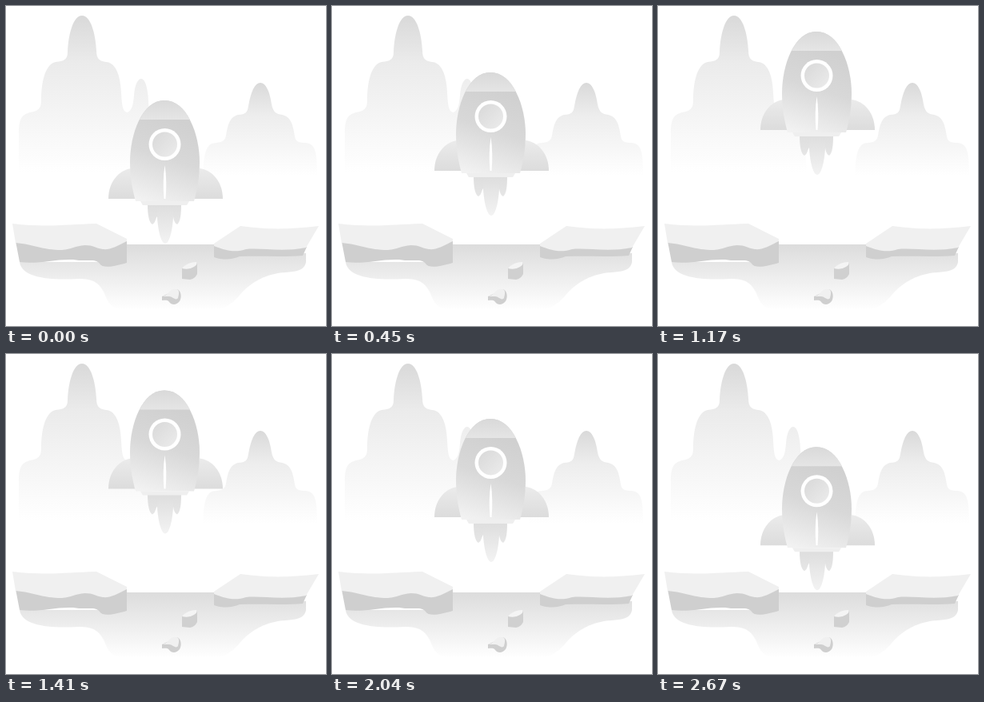
Animation, 400 px wide and 400 px high, one loop 2700 ms. Source, as an HTML page:

```html
<!DOCTYPE html>
<html lang="en">
<head>
<meta charset="utf-8">
<title>Rocket</title>
<style>
  html, body { margin: 0; width: 100%; height: 100%; overflow: hidden; background: #fff; }
  svg { display: block; width: 100vw; height: 100vh; }
</style>
</head>
<body>
<svg viewBox="0 0 400 400">
  <defs>
    <linearGradient id="peakL" gradientUnits="userSpaceOnUse" x1="0" y1="12" x2="0" y2="208">
      <stop stop-color="#d9d9d9"/><stop offset=".3" stop-color="#ebebeb"/><stop offset="1" stop-color="#fff"/>
    </linearGradient>
    <linearGradient id="peakR" gradientUnits="userSpaceOnUse" x1="0" y1="96" x2="0" y2="212">
      <stop stop-color="#d9d9d9"/><stop offset=".35" stop-color="#ededed"/><stop offset="1" stop-color="#fff"/>
    </linearGradient>
    <linearGradient id="pit" gradientUnits="userSpaceOnUse" x1="0" y1="298" x2="0" y2="380">
      <stop stop-color="#dcdcdc"/><stop offset="1" stop-color="#fff"/>
    </linearGradient>
    <linearGradient id="hull" gradientUnits="userSpaceOnUse" x1="212" y1="142" x2="178" y2="246">
      <stop stop-color="#d0d0d0"/><stop offset=".45" stop-color="#d8d8d8"/><stop offset="1" stop-color="#f2f2f2"/>
    </linearGradient>
    <linearGradient id="cap" x2="0" y2="1">
      <stop stop-color="#d9d9d9"/><stop offset="1" stop-color="#e5e5e5"/>
    </linearGradient>
    <linearGradient id="fin" x2="0" y2="1">
      <stop stop-color="#ebebeb"/><stop offset="1" stop-color="#dcdcdc"/>
    </linearGradient>
    <linearGradient id="glass" x2="1" y2="1">
      <stop stop-color="#d8d8d8"/><stop offset="1" stop-color="#ececec"/>
    </linearGradient>
    <linearGradient id="flame" x2="0" y2="1">
      <stop stop-color="#dedede"/><stop offset="1" stop-color="#e6e6e6"/>
    </linearGradient>
    <linearGradient id="core" x2="0" y2="1">
      <stop stop-color="#dedede"/><stop offset="1" stop-color="#f3f3f3"/>
    </linearGradient>
    <clipPath id="nose"><rect x="150" y="110" width="100" height="32"/></clipPath>
  </defs>

  <path fill="url(#peakL)" d="M16 210V155C17 140 20 136 30 133C41 131 44 128 44 118C44 98 48 73 62 70
    C72 69 77 67 77 58C78 35 84 12 95 12S112 35 113 56C113 67 118 69 125 70C138 71 143 88 144 108
    C145 126 146 132 152 133C158 130 159 122 160 112C161 98 165 91 169 91C174 91 177 102 178 118C179 145 184 160 186 210Z"/>
  <path fill="url(#peakR)" d="M246 213C247 192 248 177 257 172C265 170 273 172 275 162C278 144 281 139 290 136
    C300 136 302 132 303 125C306 107 311 96 318 96S330 108 332 123C334 133 338 135 345 136
    C356 138 359 149 361 163C362 170 367 171 374 171C386 172 389 180 389 213Z"/>

  <path fill="url(#pit)" d="M17 320H120L151 298H260L300 312L375 309V320C373 331 362 332 350 333
    C325 334 307 346 296 357C284 371 275 380 255 380H160C136 380 130 376 125 364C118 346 110 341 90 341C55 343 20 340 17 320Z"/>
  <path fill="#cfcfcf" d="M12 294L17 320C42 323 60 316 84 317C101 320 112 315 117 322C121 329 137 325 151 321V291Z"/>
  <path fill="#f0f0f0" d="M8 272C50 277 75 273 113 272L151 291V294C137 301 130 305 121 304C110 302 109 299 99 299
    C86 300 82 304 70 305C45 305 35 298 12 296Z"/>
  <path fill="#cfcfcf" d="M260 298V314C272 318 283 317 292 313C320 312 345 314 371 312L376 301Z"/>
  <path fill="#f0f0f0" d="M293 275C330 280 355 279 391 275L375 302C345 308 320 302 300 304C288 308 278 307 260 300V297Z"/>

  <path fill="#d0d0d0" d="M220 328L239 321V335Q236 341 230 342L220 341Z"/>
  <path fill="#f4f4f4" d="M220 328Q227 320 238 320Q240 323 235 326Q229 330 220 328Z"/>
  <path fill="#cfcfcf" d="M195 363L214 354C219 356 220 364 217 369C213 374 207 374 204 370C202 367 199 368 195 368Z"/>
  <path fill="#f0f0f0" d="M195 363C203 362 204 354 210 354C217 353 217 358 215 365C212 369 208 363 204 363Z"/>

  <g id="rocket">
    <path fill="url(#flame)" d="M177 248C177 262 179 271 183 273C187 271 187 265 189 263H209C210 270 212 272 214 273C218 270 219 260 219 248Z"/>
    <path fill="url(#core)" d="M189 249V264C190 281 194 297 199 297S208 281 209 264V249Z"/>
    <path id="wing" fill="url(#fin)" d="M128 241C128 220 141 205 157 203L165 241Z"/>
    <use href="#wing" transform="matrix(-1 0 0 1 399 0)"/>
    <path id="body" fill="url(#hull)" d="M198 118C226 118 242 160 242 195C242 214 239 230 235 244H162C158 230 155 214 155 195C155 160 170 118 198 118Z"/>
    <use href="#shell" clip-path="url(#nose)"/>
    <path fill="url(#cap)" d="M167 142C174 128 184 118 198 118S223 128 230 142Z"/>
    <path fill="#efefef" d="M168 244H229L226 249H171Z"/>
    <circle cx="198.500" cy="173" r="20" fill="#fff"/>
    <circle cx="198.500" cy="173" r="15.500" fill="url(#glass)"/>
    <path fill="#fff" d="M198.500 199Q201.500 219 199.500 241H197.500Q195.500 219 198.500 199Z"/>
  </g>
</svg>
<script>
  const LOOP = 2700, PEAK = 1134, HEIGHT = 88, STEP = 30;
  const rocket = document.getElementById("rocket");

  // Steady climb, then a slower steady descent.
  function draw() {
    const t = Math.floor(performance.now() % LOOP / STEP) * STEP;
    const lift = HEIGHT * Math.min(t / PEAK, (LOOP - t) / (LOOP - PEAK));
    rocket.setAttribute("transform", `translate(0 ${-lift})`);
    requestAnimationFrame(draw);
  }
  draw();
</script>
</body>
</html>
```
